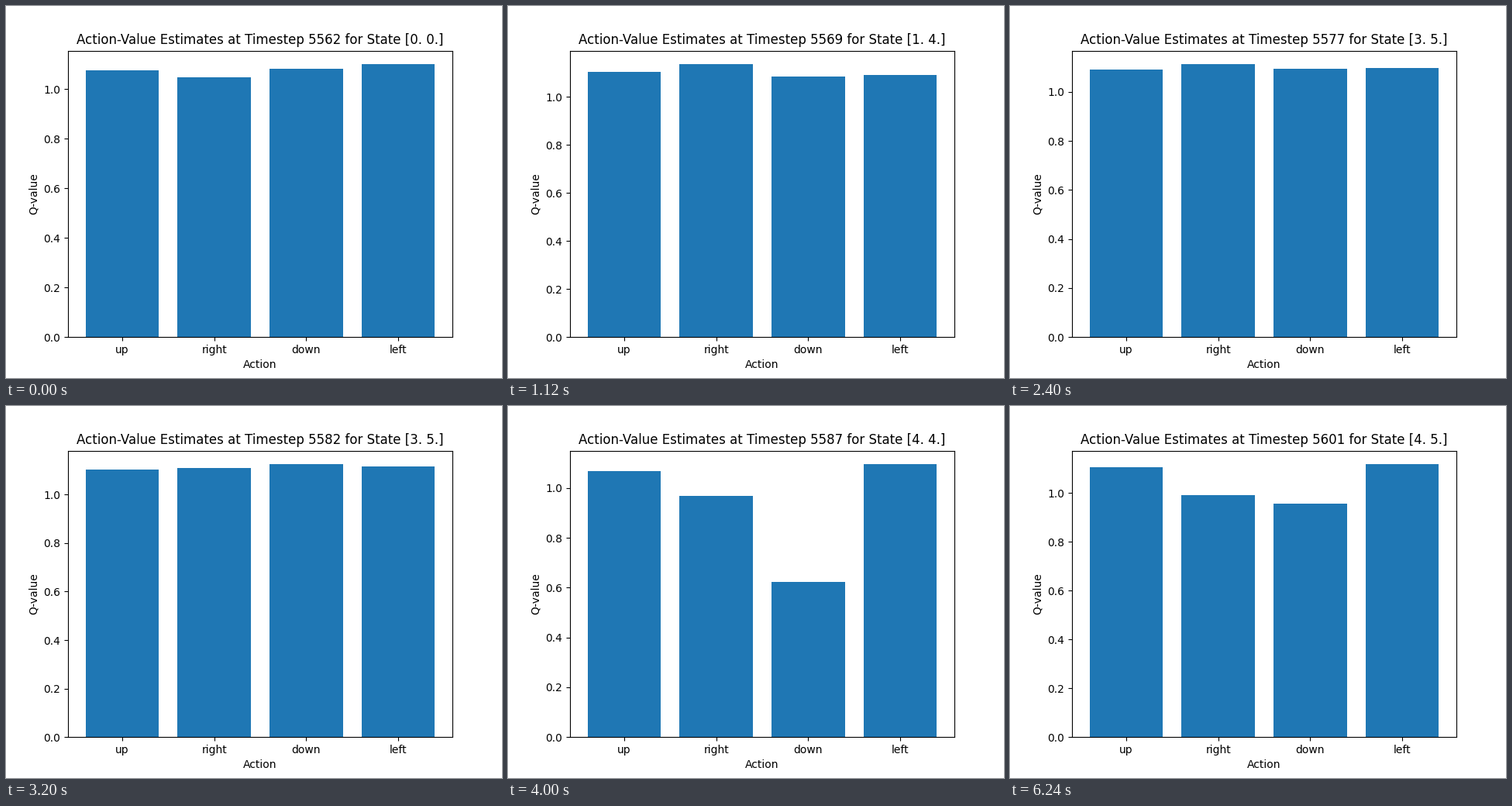
Recreate the animation shown at these times as a matplotlib script. Size 640 px wide and 480 px high, loop 6.4 s.

```python
import matplotlib.pyplot as plt
import numpy as np
from matplotlib.animation import FuncAnimation

FRAMES = 40
INTERVAL = 160
FIRST_STEP = 5562
ACTIONS = ["up", "right", "down", "left"]

# Key points of the walk: step, grid state, Q-value per action
KEYS = [
    (0, (0, 0), (1.076, 1.048, 1.082, 1.100)),
    (7, (1, 4), (1.104, 1.136, 1.085, 1.091)),
    (15, (3, 5), (1.0915, 1.113, 1.095, 1.098)),
    (20, (3, 5), (1.103, 1.109, 1.125, 1.116)),
    (25, (4, 4), (1.068, 0.9686, 0.623, 1.0955)),
    (31, (4, 5), (1.085, 0.9725, 0.9256, 1.100)),
    (39, (4, 5), (1.105, 0.991, 0.956, 1.1175)),
]


def estimates(step):
    """Walk cell by cell between key states, first along y, then along x.

    Values jump with each new cell and drift while the state is kept.
    """
    for (start, a, qa), (end, b, qb) in zip(KEYS, KEYS[1:]):
        if step <= end:
            break
    t = (step - start) / (end - start)
    dx, dy = b[0] - a[0], b[1] - a[1]
    cells = abs(dx) + abs(dy)
    if cells:
        moved = round(t * cells)
        t = moved / cells
        along_y = min(moved, abs(dy))
        a = (a[0] + int(np.sign(dx)) * (moved - along_y),
             a[1] + int(np.sign(dy)) * along_y)
    return a, np.array(qa) * (1 - t) + np.array(qb) * t


fig, ax = plt.subplots(figsize=(6.4, 4.8), dpi=100)
bars = ax.bar(ACTIONS, KEYS[0][2], color="#1f77b4")
ax.set_xlabel("Action")
ax.set_ylabel("Q-value")
title = ax.set_title("")


def update(step):
    (x, y), q = estimates(step)
    for bar, value in zip(bars, q):
        bar.set_height(value)
    ax.set_ylim(0, max(q) * 1.05)
    title.set_text(f"Action-Value Estimates at Timestep {FIRST_STEP + step}"
                   f" for State [{x}. {y}.]")
    return [*bars, title]


anim = FuncAnimation(fig, update, frames=FRAMES, interval=INTERVAL,
                     init_func=lambda: update(0), repeat=True, repeat_delay=0)
plt.show()
```
